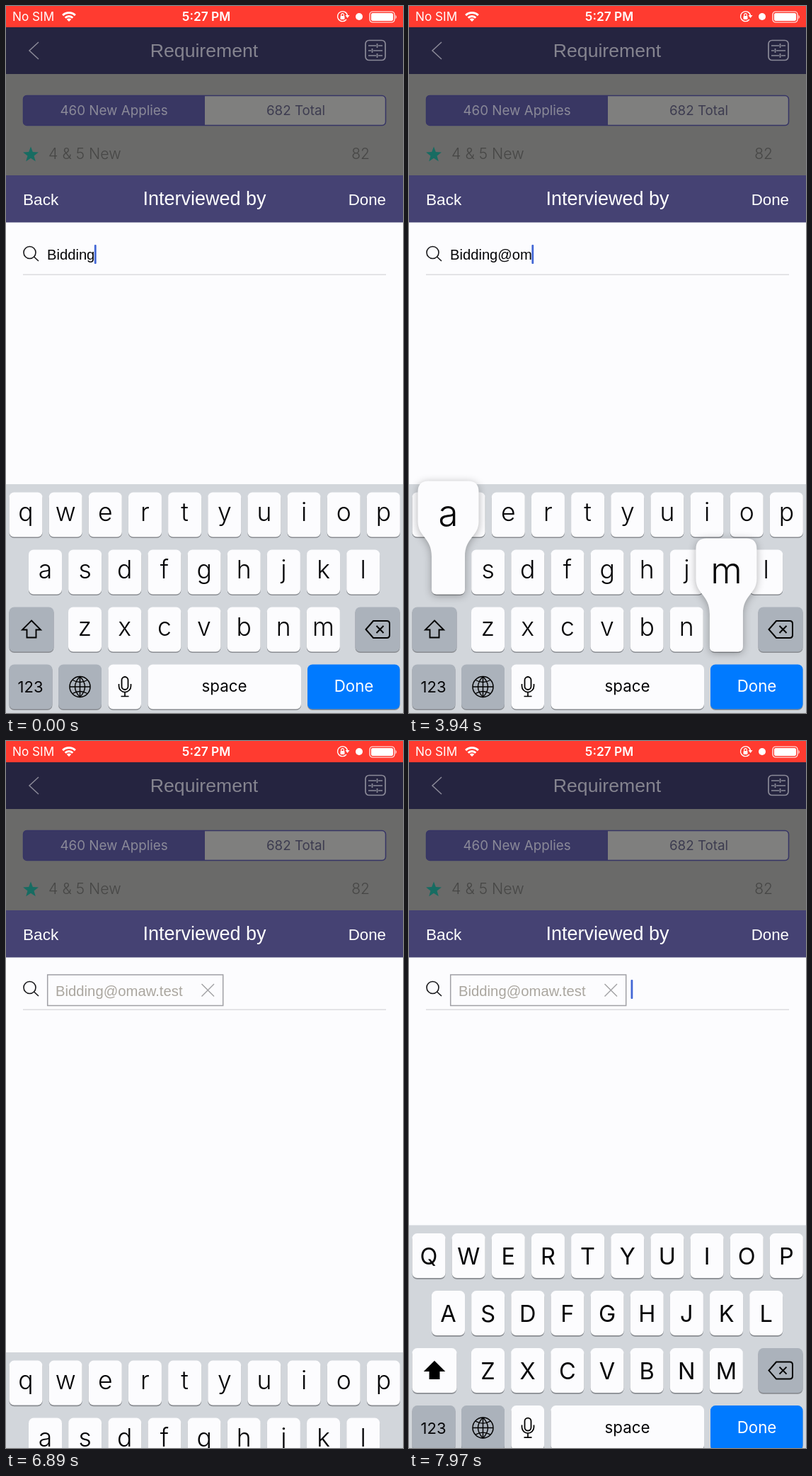
These frames come from a looping animation (561x998 px, 7990 ms). An HTML page with a canvas:

```html
<!DOCTYPE html>
<html lang="en">
<head>
<meta charset="utf-8">
<title>Interviewer search</title>
<style>
html, body { margin: 0; width: 100%; height: 100%; overflow: hidden; background: #fcfcfe; }
canvas { display: block; width: 100%; height: 100%; }
</style>
</head>
<body>
<canvas id="stage" width="561" height="998"></canvas>
<script>
const ctx = document.getElementById('stage').getContext('2d');
const LOOP = 7990;
const UI = 'Inter, Roboto, sans-serif';
const SANS = '"Liberation Sans", Arial, sans-serif';
const PAPER = '#fcfcfe', INK = '#050507', GREY_KEY = '#abb2bb', BLUE = '#007aff';

// Typing: key, press time, release time
const START_TEXT = 'Bidding';
const PRESSES = [
  ['@', 1930, 2060],
  ['o', 3380, 3500], ['m', 3780, 3915], ['a', 3915, 4030],
  ['w', 4200, 4360], ['.', 5085, 5180],
  ['t', 5700, 5800], ['e', 5850, 5950], ['s', 5990, 6080], ['t', 6120, 6220]
];
const NUMBERS_SHOWN = [[1300, 2400], [5080, 5345]];
const CARET_GAPS = [[450, 880], [2710, 3320], [4860, 5090]];
const SUBMIT = 6600, REOPEN = 7104;
const LAYOUTS = {
  lower: ['qwertyuiop', 'asdfghjkl', 'zxcvbnm'],
  upper: ['QWERTYUIOP', 'ASDFGHJKL', 'ZXCVBNM'],
  number: ['1234567890', '-/:;()₹&@″', '.,?!′']
};

const within = (t, spans) => spans.some(([a, b]) => t >= a && t < b);
const settle = x => (1 + x) * Math.exp(-x);

function text(str, x, y, size, color, { align = 'left', weight = 400, family = UI } = {}) {
  ctx.font = `${weight} ${size}px ${family}`;
  ctx.textAlign = align;
  ctx.fillStyle = color;
  ctx.fillText(str, x, y);
}

function box(x, y, w, h, r, color) {
  ctx.fillStyle = color;
  ctx.beginPath();
  ctx.roundRect(x, y, w, h, r);
  ctx.fill();
}

function outline(x, y, w, h, r, color, width = 1.5) {
  ctx.strokeStyle = color;
  ctx.lineWidth = width;
  ctx.beginPath();
  ctx.roundRect(x, y, w, h, r);
  ctx.stroke();
}

function path(d, color, width) {
  const p = new Path2D(d);
  if (width) {
    ctx.strokeStyle = color;
    ctx.lineWidth = width;
    ctx.stroke(p);
  } else {
    ctx.fillStyle = color;
    ctx.fill(p);
  }
}

function disc(x, y, r, color) {
  box(x - r, y - r, 2 * r, 2 * r, r, color);
}

function drawStatusBar() {
  box(0, 0, 561, 30, 0, '#ff3b30');
  text('No SIM', 9, 21, 17.2, '#fff');
  text('5:27 PM', 283, 21, 17.3, '#fff', { align: 'center', weight: 600 });
  for (const r of [4, 9, 14]) {
    ctx.strokeStyle = '#fff';
    ctx.lineWidth = r === 4 ? 4 : 3;
    ctx.beginPath();
    ctx.arc(89, 22, r - 1.5, -Math.PI * 0.75, -Math.PI * 0.25);
    ctx.stroke();
  }
  path('M481 19 A7 7 0 1 1 482.5 14', '#fff', 1.4);
  path('M479.5 13 h6 l-3 4z', '#fff');
  box(472.5, 14, 6, 5, 1, '#fff');
  path('M473.7 14 v-1.5 a1.8 1.8 0 0 1 3.6 0 v1.5', '#fff', 1.2);
  disc(499, 15, 5, '#fff');
  outline(514, 8, 35, 15, 4, '#fff', 1.2);
  box(516, 10, 31, 11, 2, '#fff');
  path('M550.5 12.5 q2.5 3 0 6z', '#fff');
}

function drawDimmedPage() {
  box(0, 30, 561, 66, 0, '#252440');
  path('M46 51 L33 63 L46 75', '#8b8a98', 1.5);
  text('Requirement', 280, 71.5, 26.6, '#85848f', { align: 'center', family: SANS });
  outline(508, 48.5, 28, 28, 5, '#8b8a98', 1.7);
  path('M512 56h11m3 0h6M512 63h4m3 0h13M512 70h11m3 0h6', '#8b8a98', 1.6);
  path('M524.5 53v6M517.5 60v6M524.5 67v6', '#8b8a98', 1.7);

  box(0, 96, 561, 143, 0, '#6a6a69');
  box(24, 126, 513, 42, 5, '#7f7f7e');
  box(24, 126, 257, 42, [5, 0, 0, 5], '#393763');
  outline(24.5, 126.5, 512, 42, 5, '#363465');
  text('460 New Applies', 152.5, 154, 18.8, '#8a8998', { align: 'center' });
  text('682 Total', 409.5, 154, 18.8, '#3d3c50', { align: 'center' });

  ctx.fillStyle = '#176c62';
  ctx.beginPath();
  for (let i = 0; i < 10; i++) {
    const a = i * Math.PI / 5 - Math.PI / 2, r = i % 2 ? 4.8 : 11.5;
    ctx.lineTo(35 + r * Math.cos(a), 210 + r * Math.sin(a));
  }
  ctx.fill();
  text('4 & 5 New', 60, 216, 21.3, '#474746', { weight: 300 });
  text('82', 514, 216, 21, '#474746', { align: 'right', weight: 300 });
}

function drawSheet(t) {
  const submitted = t >= SUBMIT;
  box(0, 239, 561, 759, 0, PAPER);
  box(0, 239, 561, 66.5, 0, '#454273');
  text('Back', 24, 281, 22.6, '#fff', { family: SANS });
  text('Interviewed by', 280.5, 281, 27, '#fff', { align: 'center', family: SANS });
  text('Done', 537, 281, 22.3, '#fff', { align: 'right', family: SANS });
  path('M42 348 a8.5 8.5 0 1 1 -17 0 a8.5 8.5 0 1 1 17 0 M39.5 354 L46 360', '#17171a', 1.6);
  box(24, 378.5, 513, 1.5, 0, '#dcdcdf');

  const typed = PRESSES.filter(p => p[2] <= t).map(p => p[0]).join('');
  let caretX = 313.5, caretAlpha = 1;
  if (submitted) {
    outline(58.7, 330, 248, 43.5, 0, '#a0a0a5');
    text(START_TEXT + typed, 70, 360, 20.3, '#aaa69f', { family: SANS });
    path('M276.5 343 l17.5 17.5 m0 -17.5 l-17.5 17.5', '#a0a0a3', 1.4);
    caretAlpha = t >= REOPEN ? 1 : 0;
  } else {
    text(START_TEXT + typed, 58, 358, 20.2, INK, { family: SANS });
    caretX = 57.5 + ctx.measureText(START_TEXT + typed).width;
    const gap = CARET_GAPS.find(([a, b]) => t >= a && t < b);
    if (gap) caretAlpha = Math.max(0, 1 - (t - gap[0]) / 90, 1 - (gap[1] - t) / 90);
  }
  ctx.globalAlpha = caretAlpha;
  box(caretX, 337, 2.8, 27, 1, '#4267d5');
  ctx.globalAlpha = 1;

  if (t >= 1120 && t < 1920) disc(279.5, 500, 32, '#1673b8');
}

function keyCap(x, y, w, color = PAPER) {
  box(x, y + 1.6, w, 63, 7, '#898c91');
  box(x, y, w, 63, 7, color);
}

// Places of all character keys in a layout
function characterKeys(layout) {
  return LAYOUTS[layout].flatMap((row, r) => [...row].map((char, i) => {
    const wide = layout === 'number' && r === 2;
    const left = r === 2 ? 88 : row.length === 9 ? 32 : 4.5;
    return { char, x: left + i * (wide ? 78.8 : 56.15), y: 686.5 + r * 81, w: wide ? 70 : 47 };
  }));
}

function drawPopup({ char, x, y, w }) {
  const cx = x + w / 2, l = cx - w / 2 - 19.5, r = cx + w / 2 + 19.5;
  const top = y - 97, right = x + w, bottom = y + 63;
  ctx.save();
  ctx.shadowColor = 'rgba(0,0,0,.3)';
  ctx.shadowBlur = 12;
  ctx.shadowOffsetY = 2;
  path(`M${l + 15} ${top} H${r - 15} Q${r} ${top} ${r} ${top + 15} V${y - 40}
    C${r} ${y - 18} ${right} ${y - 18} ${right} ${y + 10} V${bottom - 7}
    Q${right} ${bottom} ${right - 7} ${bottom} H${x + 7} Q${x} ${bottom} ${x} ${bottom - 7}
    V${y + 10} C${x} ${y - 18} ${l} ${y - 18} ${l} ${y - 40} V${top + 15}
    Q${l} ${top} ${l + 15} ${top}z`, PAPER);
  ctx.restore();
  text(char, cx, y - 34, 51, INK, { align: 'center', weight: 300 });
}

function drawKeyboard(t) {
  let drop = 0, layout = 'lower';
  if (t >= REOPEN) {
    drop = 323 * settle((t - REOPEN) * 0.00635);
    layout = 'upper';
  } else if (t >= SUBMIT) {
    drop = 323 * (1 - settle((t - SUBMIT) * 0.00675));
  } else if (within(t, NUMBERS_SHOWN)) {
    layout = 'number';
  }
  const numeric = layout === 'number', upper = layout === 'upper';

  ctx.save();
  ctx.translate(0, drop);
  box(0, 675, 561, 323, 0, '#d2d6db');

  const keys = characterKeys(layout);
  const [size, baseline, weight] = numeric ? [33, 44.5, 400] : upper ? [32.5, 43.5, 400] : [35.5, 40.5, 300];
  for (const { char, x, y, w } of keys) {
    keyCap(x, y, w);
    text(char, x + w / 2, y + baseline, size, INK, { align: 'center', weight });
  }

  keyCap(4.5, 848.5, 63, upper ? PAPER : GREY_KEY);
  if (numeric) {
    text('#+=', 36, 887, 19, INK, { align: 'center' });
  } else {
    const arrow = 'M36 867.5 L49 880.5 H42.5 V891.5 H29.5 V880.5 H23z';
    if (upper) path(arrow, '#000');
    path(arrow, '#000', 1.9);
  }
  keyCap(493.5, 848.5, 63, GREY_KEY);
  path('M519 868 H538 Q542 868 542 872 V888 Q542 892 538 892 H519 L508.5 880z', '#000', 2);
  path('M523.5 875 l10 10 m0 -10 l-10 10', '#000', 2);

  keyCap(4.5, 929.5, 61, GREY_KEY);
  text(numeric ? 'ABC' : '123', 34.5, numeric ? 967 : 969, numeric ? 20.3 : 22, INK, { align: 'center' });
  keyCap(74, 929.5, 61, GREY_KEY);
  path('M119 961 a14.5 14.5 0 1 1 -29 0 a14.5 14.5 0 1 1 29 0 M104.5 946.5 v29 M90 961 h29', '#000', 1.5);
  path('M104.5 946.5 q-14 14.5 0 29 q14 -14.5 0 -29 M94 951.5 q10.5 6 21 0 M94 970.5 q10.5 -6 21 0', '#000', 1.4);
  keyCap(144.5, 929.5, 46.5);
  outline(163.5, 947, 9, 18, 4.5, '#000', 1.8);
  path('M159.5 957 v3 a8.5 8.5 0 0 0 17 0 v-3 M168 969 v5.5 M162.5 974.5 h11', '#000', 1.7);
  keyCap(200.5, 929.5, 216.5);
  text('space', 308.5, 968, 22.3, INK, { align: 'center' });
  keyCap(426, 929.5, 130.5, BLUE);
  text('Done', 491.5, 968, 22.3, '#fff', { align: 'center' });

  for (const [char, press, release] of PRESSES) {
    const key = keys.find(k => k.char === char);
    if (key && t >= press && t < release + 40) drawPopup(key);
  }
  ctx.restore();
}

function draw(now) {
  const t = now % LOOP;
  ctx.clearRect(0, 0, 561, 998);
  drawStatusBar();
  drawDimmedPage();
  drawSheet(t);
  drawKeyboard(t);
}

let start;
function tick(now) {
  start ??= now;
  draw(now - start);
  requestAnimationFrame(tick);
}
draw(0);
requestAnimationFrame(tick);
</script>
</body>
</html>
```
